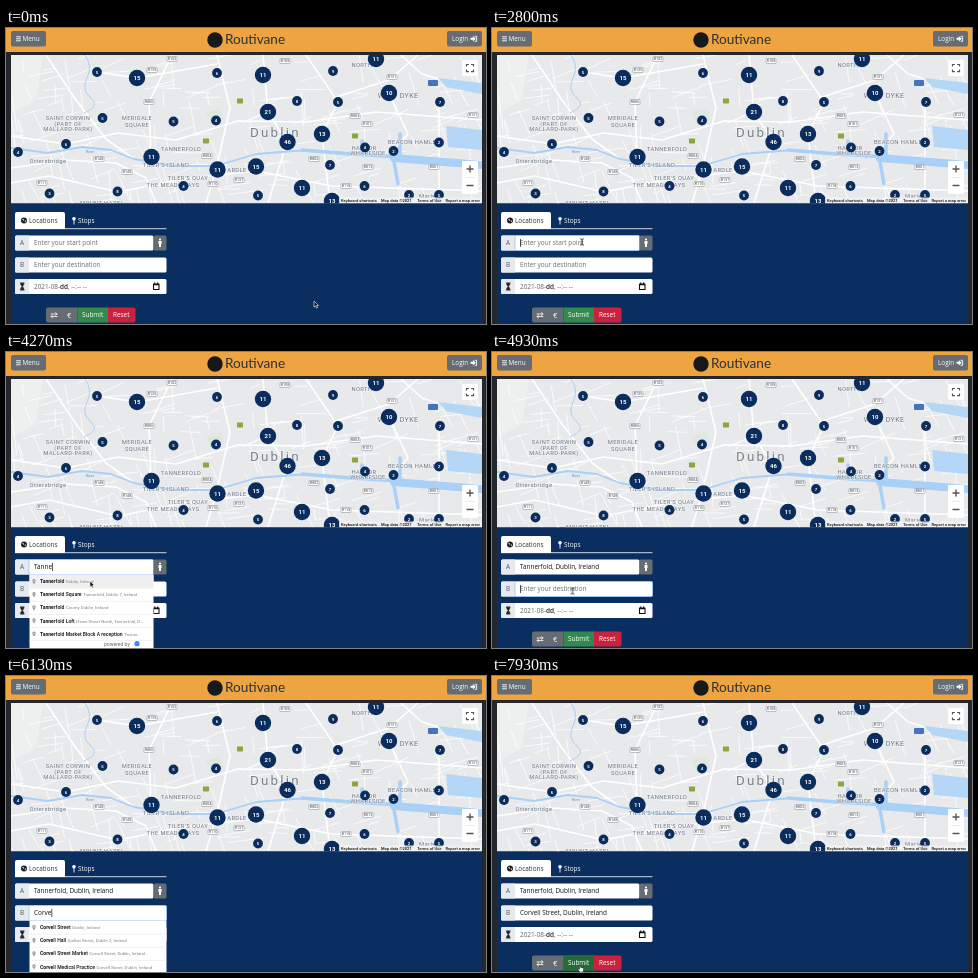
These frames come from a looping animation (480 px wide and 296 px high, 8 s). An HTML page:

```html
<!DOCTYPE html>
<html lang="en">
<head>
<meta charset="utf-8">
<title>Route planner</title>
<style>
html, body { margin: 0; width: 100%; height: 100%; overflow: hidden; background: #24272b; }
svg { display: block; width: 480px; height: 296px; }
text { font-family: "Open Sans", "Noto Sans", sans-serif; font-size: 6.4px; fill: #2b3035; }
.btn { fill: #656c73; }
.light, .light text { fill: #fff; }
.title { font-family: Lato, sans-serif; font-size: 13.6px; }
.map text { font-family: Roboto, "Noto Sans", sans-serif; fill: #687383; }
.map .pins text { font-weight: 700; fill: #fff; text-anchor: middle; }
.map .legal text { font-size: 4.1px; font-weight: 500; fill: #111; }
.road { fill: none; stroke: #fff; stroke-linejoin: round; }
.icon { fill: none; stroke-linecap: round; stroke-linejoin: round; }
.menu text { font-family: Roboto, "Noto Sans", sans-serif; font-size: 5.05px; font-weight: 500; fill: #111; }
.menu .hit { font-weight: 700; }
.menu .sub { font-size: 4.4px; font-weight: 400; fill: #808080; }
.ring { fill: none; stroke: #9ccbfa; stroke-width: .9; }

/* 1% of the loop is 80 ms */
.step { animation: 8s step-end infinite; visibility: hidden; }
#focusA { animation-name: focusA; }
#focusB { animation-name: focusB; }
#menuA { animation-name: menuA; }
#menuB { animation-name: menuB; }
#hoverA { animation-name: hoverA; }
#hoverB { animation-name: hoverB; }
#hoverSubmit, #hand { animation-name: submit; }
#arrow { animation-name: arrow; }
#beam { animation-name: beam; }
#cursor { animation: path 8s ease-in-out infinite; }
@keyframes focusA { 0%, 60.875%, 100% { visibility: hidden } 30.875% { visibility: visible } }
@keyframes focusB { 0%, 84.125%, 100% { visibility: hidden } 60.875% { visibility: visible } }
@keyframes menuA { 0%, 55.875%, 100% { visibility: hidden } 40.875% { visibility: visible } }
@keyframes menuB { 0%, 84.125%, 100% { visibility: hidden } 72.5% { visibility: visible } }
@keyframes hoverA { 0%, 55.875%, 100% { visibility: hidden } 51.5% { visibility: visible } }
@keyframes hoverB { 0%, 84.125%, 100% { visibility: hidden } 81.5% { visibility: visible } }
@keyframes submit { 0% { visibility: hidden } 89.125%, 100% { visibility: visible } }
@keyframes arrow {
  0%, 48.375%, 80% { visibility: visible }
  25%, 57.5%, 89.125%, 100% { visibility: hidden }
}
@keyframes beam {
  0%, 37.5%, 67.5%, 100% { visibility: hidden }
  25%, 57.5% { visibility: visible }
}
@keyframes path {
  0%, .875% { transform: translate(308px, 273px) }
  5.875%, 8.375% { transform: translate(268px, 262px) }
  14.125%, 16.625% { transform: translate(168px, 233px) }
  20.875%, 24.125% { transform: translate(106.5px, 216.5px) }
  28.375%, 48.375% { transform: translate(90px, 214px) }
  53%, 55.875% { transform: translate(84px, 229px) }
  59.125%, 80% { transform: translate(80.5px, 239px) }
  82.5%, 84.125% { transform: translate(76px, 251px) }
  90% { transform: translate(87px, 287px) }
  91.625%, 100% { transform: translate(88px, 289px) }
}
</style>
</head>
<body>
<svg viewBox="0 0 480 296">
  <defs>
    <clipPath id="mapClip"><rect x="5" y="27" width="471" height="148.5"/></clipPath>
  </defs>

  <rect width="480" height="24" fill="#eea441"/>
  <rect class="btn" x="5" y="3" width="35" height="15.5" rx="2"/>
  <path class="icon" d="M10.5 8.8h4M10.5 10.8h4M10.5 12.8h4" stroke="#fff" stroke-width=".9"/>
  <text x="16.5" y="13" class="light">Menu</text>
  <circle cx="209" cy="12" r="7.7" fill="#16181a"/>
  <text x="219" y="16" class="title">Routivane</text>
  <rect class="btn" x="441" y="3" width="35" height="15.5" rx="2"/>
  <text x="446" y="13" class="light">Login</text>
  <path d="M464.5 9.8h2.3V8l3 2.8-3 2.8v-1.8h-2.3z" fill="#fff"/>
  <path class="icon" d="M469 8.3h1.6v5H469" stroke="#fff" stroke-width=".9"/>

  <g class="map" clip-path="url(#mapClip)">
    <rect x="5" y="27" width="471" height="149" fill="#e8e9eb"/>
    <path d="M5 27H37L30 72 5 86Z" fill="#eeefef"/>
    <path d="M200 84l14-4 4 12-13 5z" fill="#dfe8df"/>
    <g id="streets"></g>
    <g class="road" stroke-width="1.6">
      <path d="M5 108 60 116 112 105 170 112 232 93 300 94 370 84 476 92"/>
      <path d="M40 27 70 72 100 111 128 131M166 27 143 74 145 128M257 27 262 84 281 114 262 175"/>
      <path d="M5 155 43 148 112 164 178 151 250 143 326 158 476 163"/>
      <path d="M211 27 224 80 210 142 200 175M300 27 332 74 316 106 324 175"/>
      <path d="M327 70 383 52 412 27M383 65 402 106 387 123M433 74 433 175M91 44 131 50 211 36"/>
      <path d="M5 140 60 132 110 135 140 150 150 175M395 27 416 46 476 64"/>
    </g>
    <g class="icon" stroke="#a9d0f6">
      <path d="M79 27Q87 38 81 50T85 70T78 85" stroke-width="1"/>
      <path d="M5 120 42 125 76 119 105 122 128 131 166 138 210 138 250 126 301 122" stroke-width="1.8"/>
      <path d="M296 122 345 126 395 129" stroke-width="3.4"/>
      <path d="M388 130 476 137" stroke-width="8"/>
      <path d="M356 113v11M394 106v22M388 134l4 22" stroke-width="3.5"/>
    </g>
    <path d="M432 50l44 5v11l-36-7zM440 98l36 4v20l-34-3z" fill="#b5d7f7"/>
    <g id="shields"></g>
    <g id="places"></g>
    <g class="pins" id="pins"></g>
    <g fill="#fff">
      <rect x="456" y="32" width="16" height="16" rx="1"/>
      <rect x="456" y="133" width="16" height="33" rx="1"/>
    </g>
    <path d="M460.5 38.5v-2h2.4M465 36.5h2.5v2M467.5 41.5v2.2H465M462.9 43.7h-2.4v-2.2" fill="none" stroke="#555" stroke-width="1.2"/>
    <path d="M460.5 141h7M464 137.5v7M460.5 157.5h7" stroke="#555" stroke-width="1.4"/>
    <path d="M459 149.5h10" stroke="#ddd" stroke-width=".6"/>
    <g class="legal">
      <rect x="333" y="169.5" width="143" height="6" fill="#f2f3f4" opacity=".85"/>
      <text x="335" y="174">Keyboard shortcuts</text>
      <text x="375" y="174">Map data ©2021</text>
      <text x="411" y="174">Terms of Use</text>
      <text x="439.5" y="174">Report a map error</text>
    </g>
  </g>

  <rect x="5" y="175.5" width="471" height="121" fill="#0b2e61"/>
  <path d="M9 201v-15q0-2 2-2h46q2 0 2 2v15z" fill="#fff"/>
  <path d="M9 200.7h151.5" stroke="#fff" stroke-width=".8"/>
  <circle cx="18" cy="192.5" r="3" fill="#222"/>
  <path d="M16 191l2 .4-.5 1.6zM18.8 192l1.2 1-1 1.5z" fill="#fff"/>
  <text x="23" y="194.7">Locations</text>
  <circle cx="68" cy="190.7" r="1.8" fill="#fff"/>
  <path d="M68 192v4.5" stroke="#fff" stroke-width=".9"/>
  <text x="72" y="194.7" class="light">Stops</text>

  <g id="fields"></g>
  <rect x="147.5" y="207.5" width="13" height="15" rx="1.5" class="btn"/>
  <circle cx="154" cy="211.5" r="1.1" fill="#fff"/>
  <path d="M152.5 213h3v3h-.5v3h-2v-3h-.5z" fill="#fff"/>
  <path d="M14 255h4.5M14 262h4.5M14.6 255.2q0 2 1.6 3.3-1.6 1.3-1.6 3.3h3.3q0-2-1.6-3.3 1.6-1.3 1.6-3.3z" fill="#222" stroke="#222" stroke-width=".7"/>
  <text x="28" y="261" style="fill:#5c6269">2021-08-<tspan font-weight="600" fill="#222">dd</tspan>, --:-- --</text>
  <path d="M147.5 256h5.5v5.5h-5.5zM148.8 254.7v1M151.7 254.7v1M147.5 256.6h5.5" class="icon" stroke="#111" stroke-width="1.1"/>

  <path d="M71.5 279.5H42q-2 0-2 2v11q0 2 2 2h29.5z" class="btn"/>
  <rect x="71.5" y="279.5" width="31" height="15" fill="#348a4d"/>
  <rect id="hoverSubmit" class="step" x="71.5" y="279.5" width="31" height="15" fill="#236b39"/>
  <path d="M102 279.5h25.5q2 0 2 2v11q0 2-2 2H102z" fill="#cb213d"/>
  <path class="icon" d="M45 286h6M49.5 284.7l1.5 1.3-1.5 1.3M51 288.500h-6M46.5 287.2l-1.5 1.3 1.5 1.3" stroke="#fff" stroke-width=".8"/>
  <g class="light">
    <text x="61" y="289.7" style="font-size:7.5px">€</text>
    <text x="76" y="289.3">Submit</text>
    <text x="107" y="289.3">Reset</text>
  </g>

  <g id="menuA" class="menu step"></g>
  <g id="menuB" class="menu step"></g>

  <g id="cursor">
    <path id="arrow" class="step" d="M0 0v6.2l1.5-1.3 1 2.2 1-.5-1-2.1h2z" fill="#111" stroke="#fff" stroke-width=".6"/>
    <path id="beam" class="step icon" d="M-1.4-3.2Q0-3.2 0-2.2V2.2Q0 3.2-1.4 3.2M1.4-3.2Q0-3.2 0-2.2M0 2.2Q0 3.2 1.4 3.2" stroke="#222" stroke-width=".8"/>
    <path id="hand" class="step" d="M-.6 0q.6-.7 1.2 0v2.3l2.6.6q.8.3.6 1.2L3.2 7H-.3L-2.3 4.3q0-.9.9-.5l.8.6z" fill="#fff" stroke="#111" stroke-width=".6"/>
  </g>
</svg>

<script>
const $ = id => document.getElementById(id);
const NS = 'http://www.w3.org/2000/svg';

function add(parent, tag, attrs = {}, content = '') {
  const el = document.createElementNS(NS, tag);
  for (const key in attrs) el.setAttribute(key, attrs[key]);
  el.textContent = content;
  return parent.appendChild(el);
}

// --- map ---
let seed = 41;
const random = () => (seed = seed * 16807 % 2147483647) / 2147483647;

for (let i = 0; i < 210; i++) {
  const x = 5 + random() * 471, y = 27 + random() * 149;
  const angle = (random() < .5 ? -.2 : 1.3) + (random() - .5) * .5;
  const len = 10 + random() * 28;
  add($('streets'), 'path', {
    class: 'road', 'stroke-width': .75,
    d: `M${x} ${y}l${Math.cos(angle) * len} ${Math.sin(angle) * len}`
  });
}

const shields = [
  ['R102', 166, 31], ['R135', 146, 42], ['R108', 279, 33], ['R806', 143, 74],
  ['R131', 386, 49], ['R803', 349, 88], ['R101', 361, 96], ['R131', 467, 87],
  ['R148', 93, 131], ['R148', 121, 144], ['R110', 207, 156], ['R137', 233, 152],
  ['R118', 340, 158], ['R813', 362, 139], ['R801', 428, 139], ['R802', 308, 131],
  ['R111', 36, 155], ['R804', 201, 128]
];
for (const [name, x, y] of shields) {
  add($('shields'), 'rect', { x: x - 5, y: y - 2.5, width: 10, height: 5, rx: .8, fill: '#fff', stroke: '#7d848b', 'stroke-width': .5 });
  add($('shields'), 'text', { x, y: y + 1.4, 'text-anchor': 'middle', style: 'font-size:3.7px;fill:#444' }, name);
}
for (const [x, y] of [[234, 73], [200, 113], [349, 108]])
  add($('shields'), 'rect', { x: x - 3, y: y - 2.5, width: 6, height: 5, rx: .7, fill: '#8aa73f' });
add($('shields'), 'rect', { x: 422, y: 52, width: 10, height: 6, rx: 1, fill: '#4474bd' });

const places = [
  ['SAINT CORWIN', 62, 92], ['(PART OF', 62, 97.6], ['MALLARD-PARK)', 62, 103],
  ['MERIDALE', 131, 92], ['SQUARE', 131, 98.5], ['TANNERFOLD', 175, 122.5],
  ["TILER'S ISLAND", 160, 138.5], ["TILER'S QUAY", 182, 151.5], ['THE MEADOWAYS', 167, 158.5],
  ['ARDLE', 231, 144], ['NORTH D', 359, 39], ['WEST DYKE', 392, 70, 7],
  ['BEACON HAMLET', 408, 116], ['HARBOR', 358, 121.5], ['WHARFSIDE', 362, 126.5],
  ['Ottersbridge', 42, 134.5], ['MOUNT HAZEL', 96, 176.5], ['Marlend', 425, 169.5]
];
for (const [name, x, y, size = 5.8] of places)
  add($('places'), 'text', {
    x, y, 'text-anchor': 'middle', style: `font-size:${size}px;letter-spacing:.4px`,
    stroke: '#f3f4f6', 'stroke-width': .8, 'paint-order': 'stroke'
  }, name);
add($('places'), 'text', {
  x: 244, y: 109, style: 'font-size:13.4px;letter-spacing:2.2px;fill:#79818b',
  stroke: '#f3f4f6', 'stroke-width': 1, 'paint-order': 'stroke'
}, 'Dublin');
add($('places'), 'text', { x: 80, y: 124.5, style: 'font-size:3.6px;fill:#5b8bc9' }, 'River');

const pins = [
  [91, 44, 5], [131, 50, 15], [211, 45, 6], [257, 47, 11], [327, 43, 9], [370, 31, 11],
  [383, 65, 10], [434, 74, 7], [332, 74, 5], [291, 73, 8], [262, 84, 21], [96.5, 90, 5],
  [167.5, 93.5, 5], [210, 92.5, 4], [316, 106, 13], [281.5, 114, 46], [433, 114.5, 2],
  [359, 119.5, 4], [387.5, 123, 2], [60, 116, 6], [12, 124, 4], [145.5, 129, 11],
  [211.5, 141.5, 11], [250, 138.5, 15], [324, 137, 7], [177.5, 158, 4], [296, 160, 11],
  [252, 167.5, 5], [111.5, 163.5, 8], [43.5, 165.5, 3], [358.5, 158, 6],
  [403, 167, 2], [433, 167, 5], [326, 173, 13]
];
for (const [x, y, n] of pins) {
  const big = n > 9;
  add($('pins'), 'circle', { cx: x, cy: y, r: big ? 8.2 : 4.9, fill: '#0b2d5e' });
  add($('pins'), 'text', { x, y: y + (big ? 2.1 : 1.5), style: `font-size:${big ? 6 : 4.3}px` }, n);
}

// --- form ---
function field(y, right, letter, focusId) {
  const g = $('fields');
  add(g, 'rect', { x: 9, y, width: right - 9, height: 15, rx: 1.5, fill: '#fff' });
  add(g, 'path', { d: `M23 ${y}H10.5q-1.5 0-1.5 1.5v12q0 1.5 1.5 1.5H23z`, fill: '#e6e9ed' });
  add(g, 'text', { x: 16, y: y + 9.8, 'text-anchor': 'middle', style: 'fill:#555b62' }, letter);
  if (focusId)
    add(g, 'rect', { id: focusId, class: 'ring step', x: 23, y, width: right - 23, height: 15, rx: 1 });
  return {
    text: add(g, 'text', { x: 28, y: y + 9.8 }),
    caret: focusId && add(g, 'rect', { y: y + 3.5, width: .7, height: 8, fill: '#111' })
  };
}

function menu(id, hoverId, top, right, word, rows) {
  const g = $(id);
  add(g, 'rect', { x: 23.5, y: top, width: right - 23.5, height: 296 - top, fill: '#fff' });
  add(g, 'rect', { id: hoverId, class: 'step', x: 23.5, y: top + .5, width: right - 23.5, height: 13, fill: '#f0f0f0' });
  return rows.map(([rest, sub], i) => {
    const y = top + 8.7 + i * 13.1;
    add(g, 'path', { d: `M23.5 ${y + 5}H${right}`, stroke: '#e3e3e3', 'stroke-width': .5 });
    add(g, 'path', { d: `M28 ${y + 1}q-3.4-4.5 0-5.2q3.4.7 0 5.2z`, fill: '#999' });
    add(g, 'circle', { cx: 28, cy: y - 2.3, r: .6, fill: '#fff' });
    const line = add(g, 'text', { x: 34, y });
    const hit = add(line, 'tspan', { class: 'hit' });
    const tail = add(line, 'tspan');
    add(line, 'tspan', { class: 'sub', dx: 1.5 }, sub);
    return n => {
      hit.textContent = word.slice(0, n);
      tail.textContent = word.slice(n) + rest;
    };
  });
}

const inputs = [
  {
    ...field(207.5, 147.5, 'A', 'focusA'),
    hint: 'Enter your start point', word: 'Tannerfold', full: 'Tannerfold, Dublin, Ireland',
    focus: 2470, blur: 4870, pick: 4470, keys: [3070, 3200, 3400, 3530, 3660],
    rows: menu('menuA', 'hoverA', 222.5, 147.5, 'Tannerfold', [
      ['', 'Dublin, Ireland'],
      [' Square', 'Tannerfold, Dublin 7, Ireland'],
      ['', 'County Dublin, Ireland'],
      [' Loft', 'Hewn Street North, Tannerfold, D…'],
      [' Market Block A reception', 'Tanner…']
    ])
  },
  {
    ...field(229.5, 160.5, 'B', 'focusB'),
    hint: 'Enter your destination', word: 'Corvell', full: 'Corvell Street, Dublin, Ireland',
    focus: 4870, blur: 6730, pick: 6730, keys: [5400, 5670, 5800, 5930, 6070],
    rows: menu('menuB', 'hoverB', 244.5, 160.5, 'Corvell', [
      [' Street', 'Dublin, Ireland'],
      [' Hall', 'Quillan Street, Dublin 2, Ireland'],
      [' Street Market', 'Corvell Street, Dublin, Ireland'],
      [' Medical Practice', 'Corvell Street, Dublin, Ireland']
    ])
  }
];
field(251, 160.5, '');

add($('menuA'), 'text', { x: 98, y: 293.5, style: 'font-weight:400;fill:#666' }, 'powered by');
add($('menuA'), 'circle', { cx: 131, cy: 291.7, r: 2.6, fill: '#4285f4' });

function draw(input, t) {
  const count = input.keys.filter(key => t >= key).length;
  const value = t >= input.pick ? input.full : input.word.slice(0, count);
  if (value !== input.value) {
    input.value = value;
    input.text.textContent = value || input.hint;
    input.text.style.fill = value ? '#111' : '#646b73';
    input.rows.forEach(show => show(count));
  }
  const width = value ? input.text.getComputedTextLength() : 0;
  input.caret.setAttribute('x', 28.2 + width);
  input.caret.style.visibility = t >= input.focus && t < input.blur ? 'visible' : 'hidden';
}

const start = performance.now();
function frame() {
  const t = (performance.now() - start) % 8000;
  inputs.forEach(input => draw(input, t));
  requestAnimationFrame(frame);
}
frame();
</script>
</body>
</html>
```
